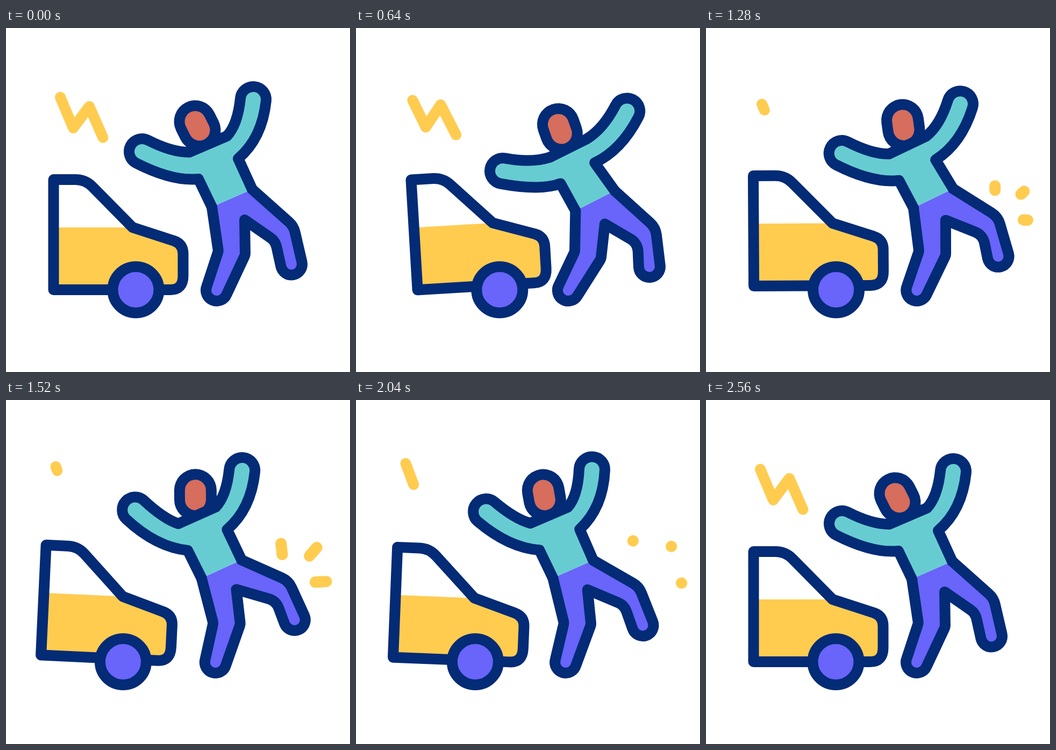
An HTML page with a canvas that plays this animation: 640 by 640 pixels, repeating every 2600 ms.

```html
<!DOCTYPE html>
<html>
<head>
<meta charset="utf-8">
<style>
html, body { margin: 0; width: 100%; height: 100%; overflow: hidden; background: #fff; }
canvas { display: block; }
</style>
</head>
<body>
<canvas id="stage" width="640" height="640"></canvas>
<script>
const ctx = document.getElementById('stage').getContext('2d');
const NAVY = '#032b76', YELLOW = '#ffcc50', PURPLE = '#6964fa', TEAL = '#67ccd1', SKIN = '#d66d5d';
const LOOP = 2600, RAD = Math.PI / 180;

const clamp = x => Math.min(1, Math.max(0, x));
const smooth = x => x * x * (3 - 2 * x);
const ramp = (t, from, to) => smooth(clamp((t - from) / (to - from)));
const middle = ([ax, ay], [bx, by]) => [(ax + bx) / 2, (ay + by) / 2];

// Point at a distance from another, in a direction given in degrees
const polar = ([x, y], deg, r) => [x + r * Math.cos(deg * RAD), y + r * Math.sin(deg * RAD)];

// Turns points about a pivot, then carries them to the pivot's new place
const turn = (pivot, deg, place = pivot) => ([x, y]) => {
  const c = Math.cos(deg * RAD), s = Math.sin(deg * RAD);
  const dx = x - pivot[0], dy = y - pivot[1];
  return [place[0] + dx * c - dy * s, place[1] + dx * s + dy * c];
};

// swing: 1 thrown right, -1 leaning left; kick: 0 to 1 while swinging back
function motion(t) {
  const out = ramp(t, 160, 830), back = ramp(t, 830, 1780);
  const stay = 1 - smooth(1 - (1 - clamp((t - 1790) / 650)) ** 1.3);
  return { swing: (out - 2 * back) * stay, kick: back * stay };
}

function line(color, width, ...pts) {
  ctx.beginPath();
  for (const p of pts) ctx.lineTo(...p);
  ctx.strokeStyle = color;
  ctx.lineWidth = width;
  ctx.stroke();
}

function fill(path, color) {
  ctx.fillStyle = color;
  ctx.fill(path);
}

function outline(path) {
  ctx.strokeStyle = NAVY;
  ctx.lineWidth = 20;
  ctx.stroke(path);
}

function tip(path, [x, y], deg, r) {
  path.arc(x, y, r, (deg + 90) * RAD, (deg - 90) * RAD, true);
}

function arm(path, hand, deg, pullIn, pullOut, end) {
  const first = polar(hand, deg + 90, 24), last = polar(hand, deg - 90, 24);
  path.quadraticCurveTo(...polar(first, deg, -pullIn), ...first);
  tip(path, hand, deg, 24);
  path.quadraticCurveTo(...polar(last, deg, -pullOut), ...end);
}

function leg(path, knee1, r1, foot, deg, knee2, r2, end) {
  path.arcTo(...knee1, ...polar(foot, deg + 90, 20), r1);
  tip(path, foot, deg, 20);
  path.arcTo(...knee2, ...end, r2);
  path.lineTo(...end);
}

function drawPerson(swing, kick) {
  // Standing leg sways about its foot
  const lean = 9 * swing, footRest = [392, 488];
  const foot = [392 + 3.5 * swing, 488];
  const sway = turn(footRest, lean, foot);
  const kneeL1 = sway([395, 415]), kneeL2 = sway([445, 422]), crotch = sway([444, 357]);

  // Torso rides on the hips
  const hips = [420, 316];
  const body = turn(hips, -4 * (swing + kick), sway(hips));
  const hipR = body([458, 300]), hipL = body([383, 333]);
  const neckR = body([411, 201]), neckL = body([341, 231]), pitL = body([358, 281]);

  // Arms turn about the shoulders
  const armR = 22 * swing + 17 * kick, armL = -20.5 * swing + 3.5 * kick;
  const shoulderR = [420, 222], shoulderL = [345, 245];
  const reachR = turn(shoulderR, armR, body(shoulderR));
  const reachL = turn(shoulderL, armL, body(shoulderL));

  // Free leg kicks from the hip and bends at the knee
  const thighRest = [451, 328], kneeRest = [518, 382];
  const thigh = turn(thighRest, -2 * swing - 24 * kick, middle(hipR, crotch));
  const shin = 9.5 * swing - 5 * kick;
  const footR = turn(kneeRest, shin, thigh(kneeRest))([531, 439]);

  const neck = [373, 217];
  const nod = turn(neck, 9 * swing + 39 * kick, body(neck));
  const head = [nod([352, 174]), nod([360, 190])];
  line(NAVY, 79, ...head);
  line(SKIN, 39, ...head);

  const torso = new Path2D();
  torso.moveTo(...hipR);
  torso.lineTo(...reachR([432, 243]));
  arm(torso, reachR([460, 133]), -84 + 1.2 * armR, 70, 50, neckR);
  torso.lineTo(...neckL);
  arm(torso, reachL([253, 230]), -153 + armL, 50, 76, pitL);
  torso.lineTo(...hipL);

  const legs = new Path2D();
  legs.moveTo(...hipL);
  leg(legs, kneeL1, 12, foot, 112 + lean, kneeL2, 12, crotch);
  leg(legs, thigh([501, 396]), 28, footR, 78 + shin, thigh([535, 368]), 36, hipR);

  fill(legs, PURPLE);
  fill(torso, TEAL);
  outline(torso);
  outline(legs);
}

// Car body around the wheel centre
const carBody = new Path2D('M-153-205H-112Q-94-205-81-192L-6-116 71-91Q88-85 88-67V-26Q88 0 64 0H-153Z');
const wheel = new Path2D();
wheel.arc(0, 0, 43, 0, 7);

function drawCar(swing, kick) {
  ctx.save();
  ctx.translate(241.5 + 32 * swing - 4 * kick, 487);
  ctx.save();
  ctx.translate(0, -11 * swing - 15 * kick);
  ctx.rotate(-4.2 * swing * RAD);
  ctx.save();
  ctx.clip(carBody);
  ctx.fillStyle = YELLOW;
  ctx.fillRect(-160, -116, 260, 120);
  ctx.restore();
  outline(carBody);
  ctx.restore();
  fill(wheel, PURPLE);
  outline(wheel);
  ctx.restore();
}

// Visible stretch of the bolt, measured from its resting start
function boltRange(t) {
  if (t > 1960) return [0, 175 * ramp(t, 1920, 2300)];
  const slide = 42 * ramp(t, 1280, 1960);
  return [24 * ramp(t, 480, 960) - slide, 175 - 143 * ramp(t, 840, 1330) - slide];
}

function drawBolt(t, swing, kick) {
  const [from, to] = boltRange(t);
  ctx.save();
  ctx.translate(140 + 4.5 * swing - 14 * kick, 166 - 3 * swing - 20 * kick);
  ctx.rotate(-4.2 * swing * RAD);
  ctx.setLineDash([to - from, 999]);
  ctx.lineDashOffset = -(from + 40);
  line(YELLOW, 20, [-54.5, -74], [-15, 20], [15, -20], [44, 46]);
  ctx.restore();
}

function drawSparks(t, swing, kick) {
  const from = 30 * ramp(t, 1400, 2080), to = 30 * ramp(t, 1050, 1730);
  if (to - from < 0.2) return;
  const sway = turn([420, 506], 8.5 * swing - kick);
  for (const [x, y, deg] of [[537, 301.5, -90], [585.3, 308.7, -43], [590, 356.5, 3]]) {
    line(YELLOW, 21, sway(polar([x, y], deg, from)), sway(polar([x, y], deg, to)));
  }
}

function draw(now) {
  const t = now % LOOP, { swing, kick } = motion(t);
  ctx.fillStyle = '#fff';
  ctx.fillRect(0, 0, 640, 640);
  ctx.lineCap = ctx.lineJoin = 'round';
  drawBolt(t, swing, kick);
  drawSparks(t, swing, kick);
  drawCar(swing, kick);
  drawPerson(swing, kick);
  requestAnimationFrame(draw);
}
requestAnimationFrame(draw);
</script>
</body>
</html>
```
